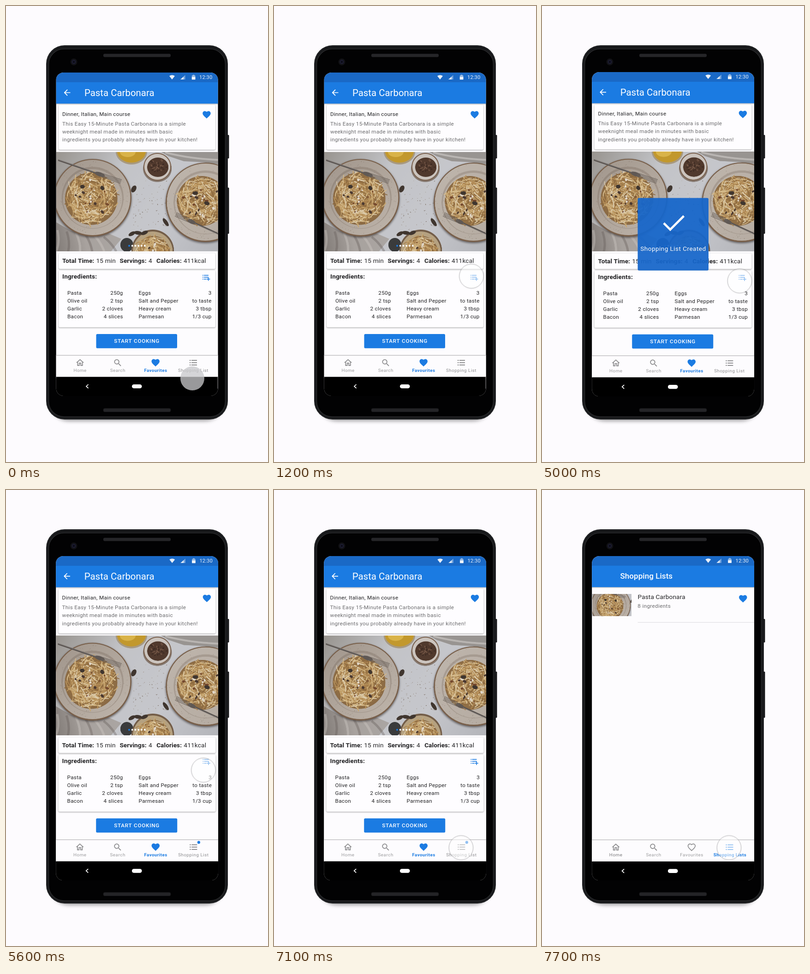
Write an HTML page with a canvas that moves like this. It is 568 by 987 pixels and loops after 8000 ms.

```html
<!DOCTYPE html>
<html lang="en">
<head>
<meta charset="utf-8">
<title>Recipe app</title>
<style>
html, body { margin: 0; width: 100%; height: 100%; overflow: hidden; background: #fdfbfe; }
canvas { display: block; width: 568px; height: 987px; }
</style>
</head>
<body>
<canvas id="stage"></canvas>
<script>
const W = 568, H = 987, LOOP = 8000, STEP = 100;
const BLUE = '#1b7be2', DARK_BLUE = '#1a69c6', GREY = '#9a9a9c', INK = '#222224', PAPER = '#fdfcfe';
const canvas = document.getElementById('stage');
const dpr = window.devicePixelRatio || 1;
canvas.width = W * dpr;
canvas.height = H * dpr;
let g = canvas.getContext('2d');
g.scale(dpr, dpr);

const ICON = {
  heart: new Path2D('M12 21.35l-1.45-1.32C5.4 15.36 2 12.28 2 8.5 2 5.42 4.42 3 7.5 3c1.74 0 3.41.81 4.5 2.09C13.09 3.81 14.76 3 16.5 3 19.58 3 22 5.42 22 8.5c0 3.78-3.4 6.86-8.55 11.54L12 21.35z'),
  home: new Path2D('M12 5.69l5 4.5V18h-2v-6H9v6H7v-7.81l5-4.5M12 3L2 12h3v8h6v-6h2v6h6v-8h3L12 3z'),
  search: new Path2D('M15.5 14h-.79l-.28-.27A6.47 6.47 0 0 0 16 9.5 6.5 6.5 0 1 0 9.5 16c1.61 0 3.09-.59 4.23-1.57l.27.28v.79l5 4.99L20.49 19l-4.99-5zm-6 0C7.01 14 5 11.99 5 9.5S7.01 5 9.5 5 14 7.01 14 9.5 11.99 14 9.5 14z'),
  back: new Path2D('M20 11H7.83l5.59-5.59L12 4l-8 8 8 8 1.41-1.41L7.83 13H20v-2z')
};

// ---------- drawing helpers ----------
function rect(x, y, w, h, fill) {
  g.fillStyle = fill;
  g.fillRect(x, y, w, h);
}

function round(x, y, w, h, r, fill, stroke, line = 1) {
  g.beginPath();
  g.roundRect(x, y, w, h, r);
  if (fill) { g.fillStyle = fill; g.fill(); }
  if (stroke) { g.strokeStyle = stroke; g.lineWidth = line; g.stroke(); }
}

function oval(x, y, rx, ry, fill, angle = 0) {
  g.beginPath();
  g.ellipse(x, y, rx, ry, angle, 0, 7);
  g.fillStyle = fill;
  g.fill();
}

function poly(points, fill) {
  g.beginPath();
  points.forEach(p => g.lineTo(...p));
  g.closePath();
  g.fillStyle = fill;
  g.fill();
}

function line(points, color, width) {
  g.beginPath();
  points.forEach(p => g.lineTo(...p));
  g.strokeStyle = color;
  g.lineWidth = width;
  g.stroke();
}

function curve(x0, y0, cx, cy, x1, y1, color, width) {
  g.beginPath();
  g.moveTo(x0, y0);
  g.quadraticCurveTo(cx, cy, x1, y1);
  g.strokeStyle = color;
  g.lineWidth = width;
  g.stroke();
}

function shades(gradient, ...colors) {
  colors.forEach((c, i) => gradient.addColorStop(i / (colors.length - 1), c));
  return gradient;
}

function text(str, x, y, size, color, { weight = 400, gap = 0.3, align = 'left' } = {}) {
  g.font = `${weight} ${size}px Roboto, sans-serif`;
  g.letterSpacing = gap + 'px';
  g.textAlign = align;
  g.fillStyle = color;
  g.fillText(str, x, y);
}

function icon(name, x, y, color, outline) {
  g.save();
  g.translate(x, y);
  g.scale(0.87, 0.87);
  g.translate(-12, -12);
  if (outline) {
    g.translate(1.2, 1.2);
    g.scale(0.9, 0.9);
    g.strokeStyle = color;
    g.lineWidth = 2.1;
    g.stroke(ICON[name]);
  } else {
    g.fillStyle = color;
    g.fill(ICON[name]);
  }
  g.restore();
}

function zoom(k) {
  g.translate(284, 480);
  g.scale(k, k);
  g.translate(-284, -480);
}

function faded(alpha, draw) {
  if (alpha <= 0) return;
  g.save();
  g.globalAlpha = alpha;
  draw();
  g.restore();
}

// ---------- food picture, in screen coordinates from (109, 316) ----------
const PIC = { x: 109, y: 315.5, w: 350, h: 215 };

function makeRandom(seed) {
  return () => (seed = (seed * 16807) % 2147483647) / 2147483647;
}

function pasta(cx, cy, r, count, rnd) {
  const tones = ['#c6a56f', '#ab8350', '#d3b888', '#8d6a40', '#b9935c', '#dccbaa'];
  oval(cx, cy + 1, r * 0.93, r * 0.93, shades(g.createRadialGradient(cx, cy, r * 0.6, cx, cy, r * 0.93), '#9b7747', '#8a6a45'));
  g.lineCap = 'round';
  for (let i = 0; i < count; i++) {
    const a = rnd() * 6.28, d = Math.sqrt(rnd()) * r * 0.82;
    const x = cx + Math.cos(a) * d, y = cy + Math.sin(a) * d;
    const dir = a + 1.57 + (rnd() - 0.5) * 2, len = 7 + rnd() * 9, bend = (rnd() - 0.5) * 14;
    const dx = Math.cos(dir) * len, dy = Math.sin(dir) * len;
    curve(x - dx, y - dy, x + bend, y + bend, x + dx, y + dy, tones[Math.floor(rnd() * tones.length)], 1.3 + rnd());
  }
  for (let i = 0; i < r / 3; i++) {
    const a = rnd() * 6.28, d = rnd() * r * 0.75;
    const tone = ['#e0d6c8', '#75492e', '#4c3a31'][i % 3];
    oval(cx + Math.cos(a) * d, cy + Math.sin(a) * d, 1.5 + rnd() * 3, 1 + rnd() * 2, tone, a);
  }
}

function plate(x, y, r, rnd, dark, light) {
  g.save();
  g.shadowColor = 'rgba(45,40,40,.7)';
  g.shadowBlur = 10;
  g.shadowOffsetY = 4;
  oval(x, y, r, r, '#79604b');
  g.restore();
  const glaze = shades(g.createLinearGradient(x - r, y - r, x + r, y + r), dark, light);
  oval(x, y - 0.5, r - 2.5, r - 2.5, glaze);
  oval(x, y, r - 17, r - 17, 'rgba(90,75,62,.22)');
  oval(x, y + 2, r - 20, r - 20, glaze);
  for (let i = 0; i < 70; i++) {
    const a = rnd() * 6.28, d = r - 4 - rnd() * 20;
    oval(x + Math.cos(a) * d, y + Math.sin(a) * d, 0.5, 0.5, '#85776a');
  }
}

function fork(x, y, angle, len) {
  g.save();
  g.translate(x, y);
  g.rotate(angle);
  g.lineCap = 'round';
  line([[0, 0], [len * 0.62, 0]], '#57514e', 3.4);
  line([[0, -1], [len * 0.62, -1]], '#8d8783', 0.9);
  oval(len * 0.66, 0, len * 0.08, 4.5, '#5f5854');
  for (let i = -1.5; i <= 1.5; i++) line([[len * 0.68, i * 2.4], [len, i * 2.8]], '#69615b', 1.1);
  g.restore();
}

function paintPicture() {
  const pic = document.createElement('canvas'), k = 2;
  pic.width = PIC.w * k;
  pic.height = PIC.h * k;
  const screen = g, rnd = makeRandom(77);
  g = pic.getContext('2d');
  g.scale(k, k);
  g.translate(-PIC.x, -PIC.y);

  rect(109, 315, 351, 217, shades(g.createLinearGradient(109, 316, 459, 530), '#98948f', '#c3c4c8', '#c6c7cc', '#b4b5ba'));
  poly([[335, 315], [460, 315], [460, 342], [425, 338], [385, 336], [352, 325]], '#989491');
  curve(345, 317, 400, 331, 460, 333, '#b9b5b2', 4);
  for (let i = 0; i < 75; i++) {
    oval(275 + rnd() * 75, 375 + rnd() * 115, 0.4 + rnd() * 1.2, 0.6, i % 4 ? '#a39a93' : '#786a60', rnd() * 3);
  }

  poly([[109, 468], [140, 486], [180, 498], [222, 492], [250, 504], [228, 531], [109, 531]],
    shades(g.createLinearGradient(109, 525, 235, 495), '#827c78', '#a8a29e', '#aaa5a2'));
  for (let i = 0; i < 6; i++) {
    curve(112 + i * 20, 485 + i * 3, 118 + i * 22, 512, 109 + i * 26, 531,
      i % 2 ? 'rgba(95,88,84,.35)' : 'rgba(205,200,196,.4)', 5);
  }

  oval(272, 315, 34, 28, '#a8997f');
  oval(272, 314, 31, 25, '#c2982d');
  oval(264, 316, 17, 11, '#d9b349');
  oval(328, 352, 31, 29, '#85786f');
  oval(328, 348, 30, 30, '#7b624f');
  oval(328, 348, 28, 28, '#cbc4be');
  oval(329, 349, 23, 21, '#50392d');
  for (let i = 0; i < 45; i++) {
    const a = rnd() * 6.28, d = rnd() * 19;
    oval(329 + Math.cos(a) * d, 349 + Math.sin(a) * d, 2.2, 1.2, i % 2 ? '#705343' : '#3f2c24', a);
  }

  plate(188, 415, 84, rnd, '#a0958b', '#c0b6ac');
  pasta(185, 416, 61, 330, rnd);
  plate(432, 425, 86, rnd, '#beb5ac', '#b5aba1');
  pasta(424, 421, 58, 310, rnd);
  fork(115, 334, 0.33, 142);
  fork(468, 497, Math.PI + 0.43, 110);

  oval(262, 517, 14, 15, '#3a3b3c');
  oval(318, 530, 46, 46, '#735d48');
  oval(318, 531, 43, 43, '#b5a180');
  pasta(319, 533, 39, 140, rnd);
  [[277, 396, 5, 8, 0.5], [346, 468, 4, 10, -0.6], [286, 491, 9, 4, 0.1], [273, 493, 8, 4, -0.5],
   [300, 491, 8, 4, -0.4], [410, 405, 6, 4, 0], [435, 427, 6, 4, 0.3], [166, 391, 5, 4, 0], [209, 394, 5, 4, 1]]
    .forEach(([x, y, a, b, turn]) => oval(x, y, a, b, '#40362f', turn));
  g = screen;
  return pic;
}

const picture = paintPicture();

// ---------- phone ----------
function phone() {
  rect(0, 0, W, H, '#fdfbfe');
  round(479, 279, 4.5, 51, 1.5, '#151517');
  round(479, 393, 4.5, 100, 1.5, '#151517');
  g.save();
  g.shadowColor = 'rgba(0,0,0,.4)';
  g.shadowBlur = 9;
  g.shadowOffsetY = 5;
  round(98, 790, 372, 103, 38, '#17181a');
  g.restore();
  round(87, 85, 394, 810, 40, '#17181a');
  round(88.5, 86.5, 391, 807, 38.5, null, '#242528', 1.2);
  round(92.5, 93, 383, 796, 33, '#020203', '#28292b', 1.6);
  round(211, 103.5, 146, 7, 3, '#252528');
  round(211, 871, 146, 7.5, 3, '#242427', '#161618');
  oval(147, 121, 7.5, 7.5, '#111114');
  oval(147, 121, 4.5, 4.5, '#1b1b30');
  oval(147, 121, 2.3, 2.3, '#0b0b14');
}

function statusBar() {
  rect(108, 143, 353, 22, DARK_BLUE);
  const white = 'rgba(255,255,255,.9)';
  g.beginPath();
  g.moveTo(360, 159);
  g.lineTo(354, 151.5);
  g.quadraticCurveTo(360, 147.5, 366, 151.5);
  g.closePath();
  g.fillStyle = white;
  g.fill();
  poly([[388.5, 149.5], [388.5, 159], [378, 159]], 'rgba(255,255,255,.4)');
  poly([[385, 152.7], [385, 159], [378, 159]], 'rgba(255,255,255,.75)');
  rect(404.8, 148.7, 3.6, 2, 'rgba(255,255,255,.5)');
  round(402.8, 150, 7.6, 9.2, 1, 'rgba(255,255,255,.5)');
  rect(402.8, 153.5, 7.6, 5.7, white);
  text('12:30', 419, 158, 11.2, white, { gap: 0.1 });
}

function chrome() {
  rect(108, 211, 353, 3, shades(g.createLinearGradient(0, 211, 0, 214), 'rgba(0,0,0,.28)', 'rgba(0,0,0,0)'));
  rect(108, 164, 353, 47.3, BLUE);
  statusBar();
}

function bulletList(x, y, color) {
  for (let i = -1; i <= 1; i++) {
    rect(x - 8, y + i * 5 - 1, 2.3, 2, color);
    rect(x - 4, y + i * 5 - 0.9, 12, 1.8, color);
  }
}

function tabs(onList) {
  rect(108, 755.5, 353, 50, PAPER);
  rect(108, 755.5, 353, 1.2, '#b4b3b6');
  const label = (str, x, on, color = GREY) =>
    text(str, x, 791.7, 9.74, on ? BLUE : color, { weight: on ? 700 : 400, gap: on ? 0.42 : 0.55, align: 'center' });
  icon('home', 160.5, 772, '#8b8b8d');
  label('Home', 160.6, false, onList ? '#777779' : GREY);
  icon('search', 242.3, 772.3, '#8b8b8d');
  label('Search', 242.3, false);
  icon('heart', 324.2, 772, onList ? '#8b8b8d' : BLUE, onList);
  label('Favourites', 324.4, !onList);
  bulletList(406, 772, onList ? BLUE : '#858587');
  label(onList ? 'Shopping Lists' : 'Shopping List', onList ? 407 : 406, onList, '#8c8c8e');

  rect(108, 802.7, 353, 44, '#000');
  line([[178.5, 819], [174, 823.2], [178.5, 827.4]], '#fff', 1.7);
  round(273, 819, 21.5, 8.6, 4.3, '#fff');
}

function card(y, h) {
  g.save();
  g.shadowColor = 'rgba(0,0,0,.38)';
  g.shadowBlur = 3;
  g.shadowOffsetY = 1;
  round(114, y, 340, h, 3, '#fefdff');
  g.restore();
}

function addToList() {
  for (let i = 0; i < 3; i++) {
    const y = 582 + i * 4.2;
    rect(426, y, 1.8, 1.6, BLUE);
    rect(429, y, i < 2 ? 10 : 5, 1.6, BLUE);
  }
  rect(434.8, 590.3, 7.6, 1.6, BLUE);
  rect(437.8, 587.2, 1.6, 7.6, BLUE);
}

// ---------- pages ----------
const LEFT_ITEMS = [['Pasta', '250g'], ['Olive oil', '2 tsp'], ['Garlic', '2 cloves'], ['Bacon', '4 slices']];
const RIGHT_ITEMS = [['Eggs', '3'], ['Salt and Pepper', 'to taste'], ['Heavy cream', '3 tbsp'], ['Parmesan', '1/3 cup']];

function itemColumn(items, left, right) {
  items.forEach(([name, amount], i) => {
    const y = 625.2 + i * 17;
    text(name, left, y, 11.68, INK);
    text(amount, right, y, 11.68, INK, { align: 'right' });
  });
}

function recipePage(badge) {
  rect(108, 143, 353, 704, PAPER);
  card(214, 97);
  chrome();
  icon('back', 132.5, 187.5, '#fff');
  text('Pasta Carbonara', 170, 194.7, 20.4, '#fff', { gap: 0 });

  text('Dinner, Italian, Main course', 122, 238, 11.68, INK);
  ['This Easy 15-Minute Pasta Carbonara is a simple',
   'weeknight meal made in minutes with basic',
   'ingredients you probably already have in your kitchen!']
    .forEach((row, i) => text(row, 122, 259 + i * 17.1, 11.68, '#6b6b6d', { gap: 0.32 }));
  icon('heart', 435, 235.3, BLUE);

  g.drawImage(picture, PIC.x - 0.5, PIC.y, PIC.w + 1, PIC.h);
  for (let i = 0; i < 6; i++) oval(267 + i * 6.75, 519, 2, 2, i ? '#fff' : BLUE);

  card(535, 34);
  const bold = { weight: 700, gap: 0.05 }, plain = { gap: 0.15 };
  text('Total Time:', 122, 556.3, 13.63, INK, bold);
  text('15 min', 195.5, 556.3, 13.63, INK, plain);
  text('Servings:', 246.5, 556.3, 13.63, INK, bold);
  text('4', 309, 556.3, 13.63, INK, plain);
  text('Calories:', 326, 556.3, 13.63, INK, bold);
  text('411kcal', 385, 556.3, 13.63, INK, plain);

  card(572.5, 123);
  text('Ingredients:', 122, 590.3, 13.63, INK, { weight: 700, gap: 0.15 });
  addToList();
  itemColumn(LEFT_ITEMS, 133, 253.7);
  itemColumn(RIGHT_ITEMS, 287.5, 445.7);

  round(195.5, 710, 175.5, 30.7, 2.5, BLUE);
  text('START COOKING', 283.6, 729.4, 11.68, '#fff', { weight: 500, gap: 0.75, align: 'center' });
  tabs(false);
  if (badge) oval(417.5, 761.8, 3.1, 3.1, BLUE);
}

function listPage() {
  rect(108, 143, 353, 704, PAPER);
  g.save();
  zoom(1.004);
  chrome();
  tabs(true);
  g.restore();
  text('Shopping Lists', 169.5, 192.3, 17, '#fff', { weight: 500, gap: 0.05 });
  g.drawImage(picture, 0, 100, 332, 190, 108.5, 225, 85, 48.3);
  text('Pasta Carbonara', 207.5, 235.6, 13.63, INK, { gap: 0.13 });
  text('8 ingredients', 207.3, 255.2, 11.68, '#6b6b6d', { gap: 0.35 });
  icon('heart', 435.8, 235.3, BLUE);
  rect(207.5, 286, 253, 1, '#dcdbde');
}

function toast() {
  round(207.5, 415.5, 153.5, 157, 3, 'rgba(23,103,202,.94)');
  g.lineCap = 'butt';
  line([[264, 470], [278, 484], [307.5, 454.5]], '#fff', 4.6);
  text('Shopping List Created', 284.4, 529.5, 13.63, '#fff', { gap: 0.42, align: 'center' });
}

function touch(x, y, press) {
  faded(1 - press, () => oval(x, y, 26, 26, 'rgba(202,202,204,.76)'));
  faded(press, () => {
    oval(x, y, 26, 26, 'rgba(255,255,255,.52)');
    g.shadowColor = 'rgba(0,0,0,.4)';
    g.shadowBlur = 2;
    g.shadowOffsetY = 0.8;
    g.beginPath();
    g.arc(x, y, 26.3, 0, 7);
    g.strokeStyle = 'rgba(140,140,143,.6)';
    g.lineWidth = 0.7;
    g.stroke();
  });
}

// ---------- timing: keys are [time, value], eased between ----------
const TRACK = {
  x: [[0, 404], [500, 428], [3900, 428], [4000, 429.5], [4300, 429.5], [4500, 428.5], [5300, 428.5], [5600, 428], [5800, 428], [6200, 405], [6300, 405], [6500, 405.5]],
  y: [[0, 806], [500, 584.5], [3900, 584.5], [4000, 588], [4300, 588], [4500, 592], [4900, 592], [5000, 594.8], [5300, 594.8], [5600, 606], [5800, 606], [6200, 771], [6300, 771], [6500, 774]],
  press: [[1000, 0], [1200, 1], [5800, 1], [6000, 0], [6900, 0], [7100, 1]],
  toast: [[3900, 0], [4000, 1], [5300, 1], [5600, 0]],
  list: [[7500, 0], [7700, 1]]
};

function at(keys, t) {
  const i = keys.findIndex(k => k[0] > t);
  if (i === 0) return keys[0][1];
  if (i < 0) return keys[keys.length - 1][1];
  const [t0, a] = keys[i - 1], [t1, b] = keys[i];
  const p = (t - t0) / (t1 - t0);
  return a + (b - a) * p * p * (3 - 2 * p);
}

function draw(time) {
  const t = Math.floor((time % LOOP) / STEP) * STEP;
  const grown = t >= 4000;
  const list = at(TRACK.list, t);
  phone();
  g.save();
  g.save();
  if (grown) zoom(1.003);
  g.beginPath();
  g.roundRect(108.7, 143.9, 350.8, 700.1, 16);
  g.restore();
  g.clip();

  g.save();
  if (grown) zoom(1.003);
  if (list < 1) recipePage(t >= 5500);
  g.restore();
  if (!grown) rect(458.7, 803, 1, 25, '#b9b9bb');
  faded(list, listPage);
  faded(at(TRACK.toast, t), toast);
  touch(at(TRACK.x, t), at(TRACK.y, t), at(TRACK.press, t));
  g.restore();
}

const begin = performance.now();
function tick() {
  draw(performance.now() - begin);
  requestAnimationFrame(tick);
}
tick();
</script>
</body>
</html>
```
